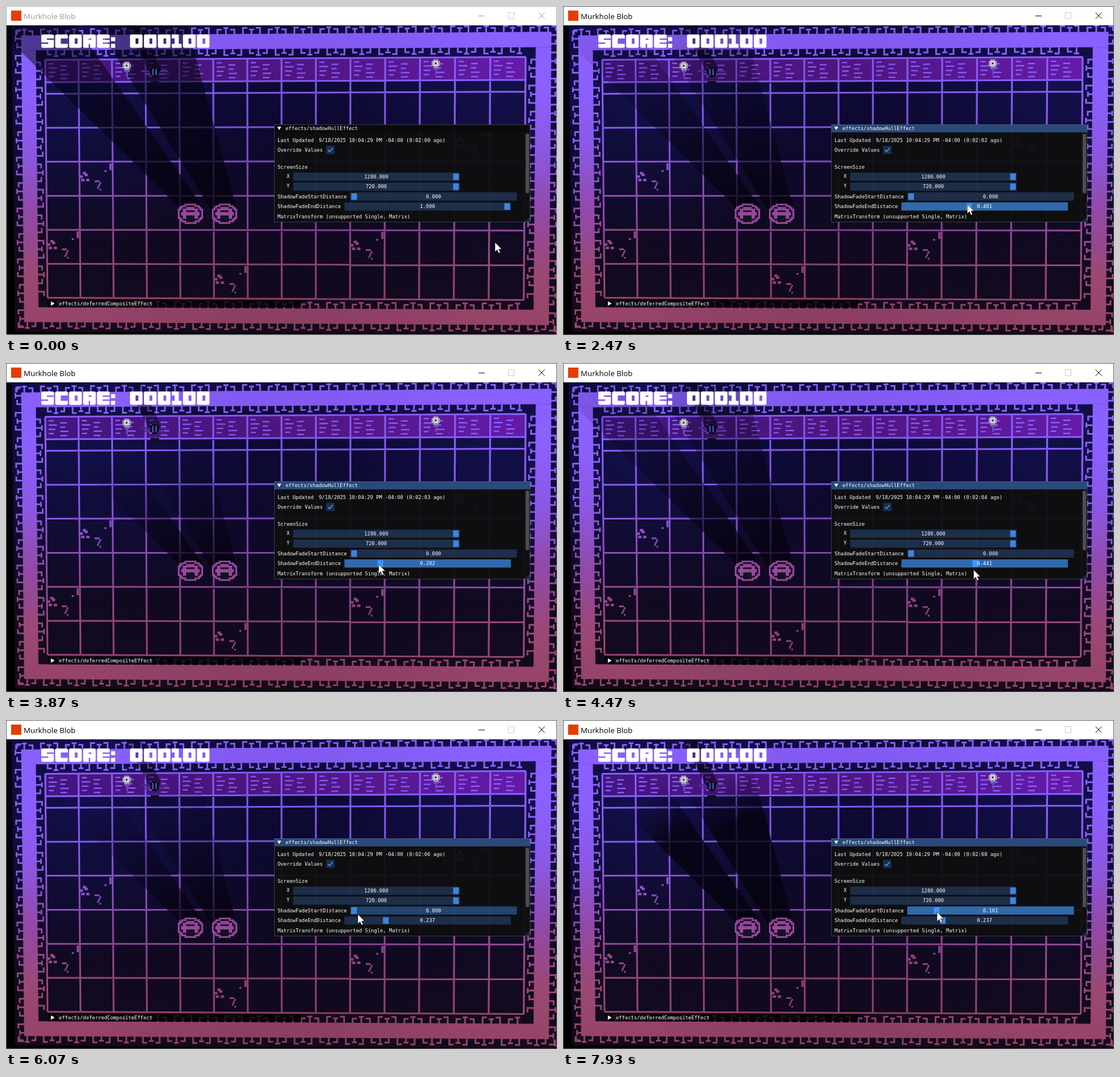
These frames come from a looping animation (968 by 578 pixels, 8000 ms). An HTML page with a canvas:

```html
<!DOCTYPE html>
<html lang="en">
<head>
<meta charset="utf-8">
<title>Murkhole Blob</title>
<style>
html, body { margin: 0; width: 100%; height: 100%; overflow: hidden; background: #000; }
canvas { display: block; }
</style>
</head>
<body>
<canvas id="stage" width="968" height="578"></canvas>
<script>
const W = 968, H = 578, LOOP = 8000, STEP = 1000 / 15;
const ctx = document.getElementById('stage').getContext('2d');
const MONO = '8.8px "DejaVu Sans Mono", monospace';
const LIGHT = { x: 441, y: 489 };
const FADE_LENGTH = 1200;
const TRAVEL = 279.5;

// Linear path through [time, value] points
function track(t, pts) {
  const i = pts.findIndex(p => p[0] > t);
  if (i === 0) return pts[0][1];
  if (i < 0) return pts[pts.length - 1][1];
  const [t0, a] = pts[i - 1], [t1, b] = pts[i];
  return a + (b - a) * (t - t0) / (t1 - t0);
}

function poseAt(t) {
  const end = track(t, [
    [900, 1], [1267, .863], [2467, .401], [3000, .191], [3333, .07],
    [3534, .07], [4467, .441], [4734, .441], [5600, .237]
  ]);
  const start = track(t, [[6800, 0], [7934, .161]]);
  const drag = 598 + TRAVEL * end;
  const x = t < 700 ? track(t, [[0, 859], [467, 878]])
    : t < 5667 ? drag
    : track(t, [[5667, drag], [6067, 618], [6333, 612]]) + TRAVEL * start;
  const y = track(t, [
    [0, 415], [467, 352], [1267, 348], [3534, 348], [4467, 363],
    [4734, 363], [5667, 358], [6067, 341], [6333, 337]
  ]);
  return { x, y, end, start };
}

function box(g, x, y, w, h, color) {
  g.fillStyle = color;
  g.fillRect(x, y, w, h);
}

function poly(g, pts) {
  pts.forEach(([x, y], i) => i ? g.lineTo(x, y) : g.moveTo(x, y));
  g.closePath();
}

function fillPoly(pts, color) {
  ctx.fillStyle = color;
  ctx.beginPath();
  poly(ctx, pts);
  ctx.fill();
}

// Evenly spread colour stops
function blend(gradient, ...colors) {
  colors.forEach((c, i) => gradient.addColorStop(i / (colors.length - 1), c));
  return gradient;
}

function glow(g, x, y, r, rgb, alpha) {
  const c = blend(g.createRadialGradient(x, y, 0, x, y, r), `rgba(${rgb},${alpha})`, `rgba(${rgb},0)`);
  box(g, 0, 34, W, H - 34, c);
}

// Room units (20 per tile) to the slightly skewed camera view
function project(px, py) {
  const u = px / 20, v = py / 20;
  const top = 69 + 58.3 * u + .142 * u * u;
  const bottom = 73 + 57.8 * u + .14 * u * u;
  const left = 94.5 + 59.7 * v, right = 89.5 + 61 * v;
  return [top + (bottom - top) * v / 7, left + (right - left) * u / 14];
}

function tileRect(g, x, y, w, h) {
  poly(g, [project(x, y), project(x + w, y), project(x + w, y + h), project(x, y + h)]);
}

// Hooked teeth growing from one edge of the border band
function teeth(g, vertical, base, dir, from, to) {
  const put = (a, b, w, h) => vertical ? tileRect(g, b, a, h, w) : tileRect(g, a, b, w, h);
  for (let p = from, n = 0; p < to; p += 5, n++) {
    const len = 3 + n % 2;
    put(p, dir > 0 ? base : base - len, 1, len);
    put(p - n % 3, dir > 0 ? base + len - 1 : base - len, 3, 1);
  }
}

function border(g) {
  const inner = 5.6, outer = 14.4, band = outer - inner;
  for (const vertical of [false, true]) {
    const run = vertical ? 140 : 280, depth = vertical ? 280 : 140;
    for (const at of [-outer, depth + inner]) {
      if (vertical) tileRect(g, at, -outer, band, run + 2 * outer);
      else tileRect(g, -outer, at, run + 2 * outer, band);
    }
    teeth(g, vertical, -inner, 1, 1, run);
    teeth(g, vertical, depth + inner, -1, 1, run);
    teeth(g, vertical, -outer, -1, -18, run + 20);
    teeth(g, vertical, depth + outer, 1, -18, run + 20);
  }
}

function crack(g, u, v) {
  const put = (x, y, w, h) => tileRect(g, u * 20 + x, v * 20 + y, w, h);
  for (let i = 0; i < 5; i++) {
    put(i, 8 + Math.round(2 * Math.sin(i * 2)), 2, 1.5);
    put(12 - i % 4 / 2, 12 + i, 1, 1);
    put(18 - (i > 3 ? 3 : 0), 1 + i, 1.3, 1);
  }
  put(9, 11, 3, 1);
}

function bricks(g) {
  for (let u = 0; u < 14; u++) {
    for (let k = 0; k < 8; k++) {
      tileRect(g, u * 20 + 2 + k * 7 % 14, 2 + k * 1.25, 3 + k % 3, .8);
    }
  }
}

function buildRoom() {
  const c = document.createElement('canvas');
  c.width = W;
  c.height = H;
  const g = c.getContext('2d');
  const vertical = () => g.createLinearGradient(0, 34, 0, H);
  box(g, 0, 0, W, H, '#000');

  g.fillStyle = blend(vertical(), '#0e0a3e', '#0d0a34', '#100a22', '#140a1c');
  g.beginPath();
  tileRect(g, -20, -20, 320, 180);
  g.fill();
  for (const x of [150, 850]) glow(g, x, 140, 280, '34,34,130', .25);

  g.fillStyle = blend(g.createLinearGradient(69, 0, 913, 0), '#43167f', '#561789', '#641ba8');
  g.beginPath();
  tileRect(g, 0, 0, 280, 13);
  g.fill();

  g.fillStyle = blend(vertical(), '#8a5fff', '#8a60ff', '#8b58e4', '#9249a8', '#9b4874', '#964265');
  g.beginPath();
  border(g);
  for (let u = 0; u <= 14; u++) tileRect(g, u * 20 - .55, 0, 1.05, 140);
  for (let v = 0; v <= 7; v++) tileRect(g, 0, v * 20 - .5, 280, 1);
  tileRect(g, 0, 12.7, 280, 1);
  bricks(g);
  for (const [u, v] of [[1, 3], [0, 5], [9, 5], [5, 6], [12, 2]]) crack(g, u, v);
  g.fill();
  glow(g, 484, 330, 430, '12,4,24', .16);
  return c;
}

function drawShadows(end, start) {
  const hulls = [
    [[302, 352], [345, 352], .8], [[363, 363], [404, 352], .8], [[252, 117], [273, 113], .5]
  ];
  const far = ([x, y]) => [x + (x - LIGHT.x) * 6, y + (y - LIGHT.y) * 6];
  for (const [a, b, dark] of hulls) {
    const near = Math.hypot((a[0] + b[0]) / 2 - LIGHT.x, (a[1] + b[1]) / 2 - LIGHT.y);
    const fade = ctx.createRadialGradient(
      LIGHT.x, LIGHT.y, near + start * FADE_LENGTH, LIGHT.x, LIGHT.y, near + end * FADE_LENGTH);
    for (let k = 0; k <= 1; k += .25) fade.addColorStop(k, `rgba(4,2,14,${dark * (1 - k) ** 1.5})`);
    fillPoly([a, b, far(b), far(a)], fade);
  }
}

// Pixel-art ellipse; pick(i, j, r) gives the colour of a cell
function pixels(x, y, cols, rows, size, pick) {
  for (let j = 0; j < rows; j++) {
    for (let i = 0; i < cols; i++) {
      const dx = i - (cols - 1) / 2, dy = j - (rows - 1) / 2;
      const color = pick(dx, dy, Math.hypot(dx / cols, dy / rows) * 2);
      if (color) box(ctx, x + (dx - .5) * size, y + (dy - .5) * size, size + .1, size + .1, color);
    }
  }
}

function drawSlime(x, y) {
  pixels(x, y, 15, 12, 2.95, (dx, dy, r) => {
    if (r > 1.03) return null;
    if (r > .84) return '#9d4da0';
    const mouth = Math.abs(dx) < 3 && dy > 1 && dy < 4;
    const brow = Math.abs(dx) < 3 && dy === -1.5;
    return mouth ? '#0b1a1c' : r > .69 || brow ? '#1e0e2c' : '#9d4da0';
  });
}

function drawTorch(x, y) {
  box(ctx, x - 4, y + 4, 9, 6, '#7150c4');
  box(ctx, x - 1, y + 9, 3, 10, '#6a48c0');
  pixels(x, y - 1, 5, 5, 2.9, (dx, dy, r) => r > 1 ? null : r > .7 ? '#a5a6b0' : r ? '#e4e6e6' : '#16202c');
}

function drawBat() {
  for (const side of [-1, 1]) {
    box(ctx, 261 + side * 17 - 7, 113, 14, 3, '#4a2788');
    box(ctx, 261 + side * 11 - 6, 118, 12, 3, '#56309a');
  }
  box(ctx, 254, 132, 15, 5, '#071216');
  pixels(261, 116, 5, 6, 2.9, (dx, dy, r) => r > 1.1 ? null : dx && r < .75 ? '#3b55a8' : '#04050f');
}

// Block letters on a ten-row grid: width, then slots cut out
const GLYPHS = {
  S: [9, [4, 3, 5, 1], [0, 6, 5, 1]],
  C: [9, [4, 3, 5, 4]],
  O: [9, [4, 3, 2, 4]],
  R: [9, [4, 3, 2, 1], [4, 7, 1, 3]],
  E: [9, [4, 3, 5, 1], [4, 6, 5, 1]],
  ':': [3, [0, 0, 3, 2], [0, 5, 3, 2]],
  1: [7, [0, 3, 2, 4], [5, 0, 2, 7]]
};
GLYPHS[0] = GLYPHS.O;

function drawScore(text, x, y) {
  const u = 2.45, h = 2.35;
  ctx.fillStyle = '#fff';
  for (const ch of text) {
    if (ch === ' ') { x += 9.6 * u; continue; }
    const [w, ...slots] = GLYPHS[ch];
    ctx.beginPath();
    ctx.roundRect(x, y, w * u, 10 * h, w > 8 ? u : 0);
    for (const [a, b, c, d] of slots) ctx.rect(x + a * u, y + b * h, c * u, d * h);
    ctx.fill('evenodd');
    x += (w + 1) * u;
  }
}

function label(s, x, y, align = 'left') {
  ctx.font = MONO;
  ctx.textAlign = align;
  ctx.fillStyle = '#fff';
  ctx.fillText(s, x, y + 3);
}

const FRAME = { idle: 'rgba(41,74,122,.54)', hover: 'rgba(66,150,250,.4)', active: 'rgba(66,150,250,.67)' };

function slider(x, y, text, v, state = 'idle') {
  box(ctx, x, y, 292.5, 14.4, FRAME[state]);
  box(ctx, x + 1.5 + TRAVEL * v, y + 1.5, 10, 11.5, state === 'active' ? '#4296fa' : '#3d85e0');
  label(text, x + 146, y + 7.2, 'center');
}

function drawPanel(t, pose, focused) {
  box(ctx, 471.5, 208, 449.5, 171.5, 'rgba(14,14,14,.94)');
  box(ctx, 471.5, 208, 449.5, 14, focused ? '#294a7a' : '#0a0a0a');
  ctx.strokeStyle = 'rgba(110,110,128,.5)';
  ctx.lineWidth = 1;
  ctx.strokeRect(471.5, 208.5, 449, 171);
  fillPoly([[476.5, 212], [483.5, 212], [480, 218]], '#fff');
  label('effects/shadowHullEffect', 491, 215);

  const secs = Math.floor((t + 100) / 1000);
  label('Last Updated', 477, 236);
  label(`9/18/2025 10:04:29 PM -04:00 (0:02:0${secs} ago)`, 549.5, 236);
  label('Override Values', 477, 253);
  box(ctx, 562.5, 245.5, 14.5, 14.5, FRAME.idle);
  ctx.strokeStyle = '#4296fa';
  ctx.lineWidth = 1.8;
  ctx.beginPath();
  ctx.moveTo(565.5, 253);
  ctx.lineTo(568.3, 256);
  ctx.lineTo(574, 249.5);
  ctx.stroke();

  label('ScreenSize', 477, 283);
  label('X', 493, 299);
  label('Y', 493, 316);
  slider(504.5, 292.7, '1280.000', 1);
  slider(504.5, 310.2, '720.000', 1);

  const over = y => focused && pose.y >= y && pose.y <= y + 14.4;
  const state = (y, held) => held ? 'active' : over(y) ? 'hover' : 'idle';
  label('ShadowFadeStartDistance', 477, 335);
  slider(605, 327.5, pose.start.toFixed(3), pose.start, state(327.5, t > 6700));
  label('ShadowFadeEndDistance', 477, 352);
  slider(594.5, 345, pose.end.toFixed(3), pose.end, state(345, focused && t < 5650));
  label('MatrixTransform (unsupported Single, Matrix)', 477, 370);

  ctx.fillStyle = '#4f4f4f';
  ctx.beginPath();
  ctx.roundRect(913, 224, 6, 105, 3);
  ctx.fill();
  fillPoly([[921, 370], [921, 379], [911, 379]], 'rgba(66,150,250,.22)');
}

function drawCollapsed() {
  box(ctx, 74, 516, 444.5, 13.5, 'rgba(0,0,0,.75)');
  fillPoly([[79, 519], [79, 526.5], [85.5, 522.7]], '#fff');
  label('effects/deferredCompositeEffect', 93, 523);
}

function drawChrome(focused) {
  box(ctx, 0, 0, W, 34, '#fff');
  box(ctx, 9, 8, 18, 18, '#e73c00');
  const ink = focused ? '#000' : '#999';
  ctx.font = '13.3px "Open Sans", "Noto Sans", sans-serif';
  ctx.textAlign = 'left';
  ctx.fillStyle = ink;
  ctx.fillText('Murkhole Blob', 31, 22.5);
  ctx.lineWidth = 1;
  ctx.strokeStyle = ink;
  ctx.beginPath();
  ctx.moveTo(830, 17.5);
  ctx.lineTo(841, 17.5);
  ctx.moveTo(935.5, 11.5);
  ctx.lineTo(946.5, 22.5);
  ctx.moveTo(946.5, 11.5);
  ctx.lineTo(935.5, 22.5);
  ctx.stroke();
  ctx.strokeStyle = '#ccc';
  ctx.strokeRect(882.5, 11.5, 10, 11);
  ctx.strokeStyle = focused ? '#5c5c5c' : '#aaa';
  ctx.strokeRect(.5, .5, W - 1, H - 1);
}

function drawCursor(x, y) {
  const shape = [[0, 0], [0, 17], [3.9, 13.4], [6.6, 19.4], [9.4, 18.2], [6.8, 12.3], [12, 12.3]];
  fillPoly(shape.map(([a, b]) => [x + a, y + b]), '#fff');
  ctx.strokeStyle = '#000';
  ctx.lineWidth = .7;
  ctx.stroke();
}

const room = buildRoom();

function draw(now) {
  const t = Math.floor((now % LOOP + 4) / STEP) * STEP % LOOP;
  const pose = poseAt(t);
  const focused = t > 640;
  ctx.drawImage(room, 0, 0);
  drawShadows(pose.end, pose.start);
  drawTorch(212, 106);
  drawTorch(755, 102);
  drawBat();
  drawSlime(324, 365);
  drawSlime(384, 365);
  drawScore('SCORE: 000100', 62, 50);
  drawCollapsed();
  drawPanel(t, pose, focused);
  drawChrome(focused);
  drawCursor(pose.x, pose.y);
}

const began = performance.now();
function tick() {
  draw(performance.now() - began);
  requestAnimationFrame(tick);
}
tick();
</script>
</body>
</html>
```
